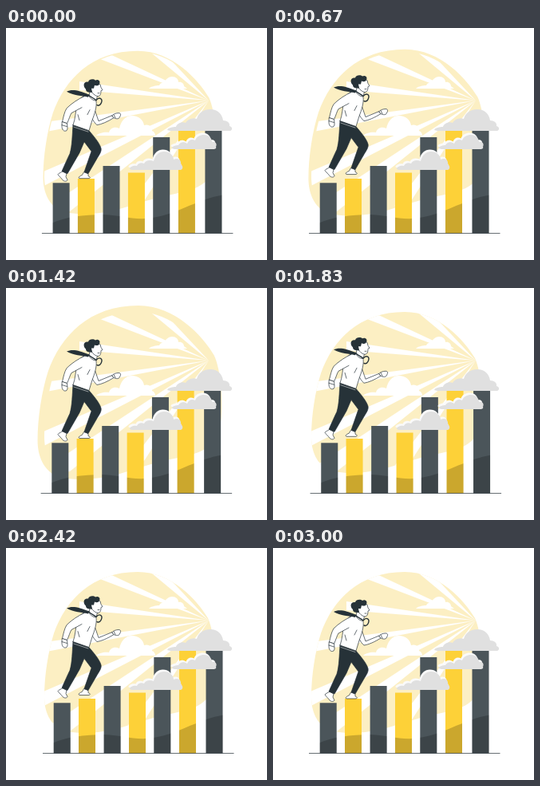
Recreate the animation shown at these times as an HTML page with a canvas. Size 327x291 px, loop 3.04 s.

```html
<!DOCTYPE html>
<html lang="en">
<head>
<meta charset="utf-8">
<title>Climbing the chart</title>
<style>
html, body { margin: 0; width: 100%; height: 100%; overflow: hidden; background: #fff; }
canvas { display: block; width: 327px; height: 291px; }
</style>
</head>
<body>
<canvas id="stage"></canvas>
<script>
const W = 327, H = 291, FRAMES = 73, LOOP = 3040, STEP = 1000 / 24;
const UNIT = 0.582; // drawing units to pixels
const INK = '#263238', DARK = '#4b555a', GOLD = '#fdd138', PALE = '#fcefc3', CLOUD = '#e0e0e0';
const canvas = document.getElementById('stage');
const ctx = canvas.getContext('2d');
const ratio = window.devicePixelRatio || 1;
canvas.width = W * ratio;
canvas.height = H * ratio;

const path = d => new Path2D(d);

const blob = path('M165 30C208 30 240 66 253 88C261 105 264 145 260 170C255 194 240 201 211 207C185 212 165 219 145 225C120 232 90 235 70 228C54 221 48 203 48 187C48 160 53 129 60 107C75 65 108 30 165 30Z');

const SUN = [254, 91];
const rays = [
  [177, 27, 197, 30], [118, 39, 126, 31], [92, 67, 92, 78], [40, 119, 40, 132],
  [40, 183, 40, 202], [40, 232, 60, 246], [147, 230, 162, 234]
];

const backClouds = [
  path('M113 135C116 132 123 130 129 131C130 126 136 123 142 126C144 117 149 110 158 110C166 110 172 115 173 122C179 120 183 124 183 129C186 130 187 133 187 135Z'),
  path('M179 76C182 73 188 72 192 72C193 69 196 68 198 69C200 64 204 61 208 61C213 61 216 64 216 68C220 67 223 70 223 73L227 76Z')
];

const bigCloud = path('M202 128C203 125 209 124 213 124C214 120 220 117 225 119C228 114 234 112 239 114C241 106 248 102 256 102C265 102 271 108 272 116C277 116 281 119 280 123C284 124 284 128 281 129L206 129Z');
const smallClouds = [
  path('M208 151C208 148 213 147 216 147C218 143 223 142 227 145C229 140 233 139 237 141C239 136 243 134 248 134C254 134 258 138 258 143C262 142 265 145 263 149C264 151 262 152 260 152L211 152Z'),
  path('M155 177C155 174 160 172 164 173C165 170 169 168 173 170C175 166 180 165 185 167C187 159 192 155 198 155C205 155 210 160 210 165C216 162 220 166 219 171C222 173 222 177 219 178L158 178Z')
];

const bars = [[58.7, 194.3], [90, 189], [121.6, 173], [153, 181.5], [184.3, 137], [216, 128], [249.5, 127]];
const shade = path('M55 246C70 238 95 234 122 234C145 235 155 240 176 239C205 236 222 225 240 219C254 213 264 211 274 209V258H55Z');

const man = {
  farArm: path('M109 96C111 103 114 111 116 117L133 110L135 113C127 118 120 121 114 122C109 118 105 109 104 101Z'),
  farHand: path('M133 110C135 108 138 107 141 107C144 107 144 109 143 111L142 113C140 115 137 114 135 113Z'),
  shirt: path('M97 86C102 83 109 87 113 92C114 99 111 108 108 116L104 129L84 122C87 114 87 105 89 97C91 91 93 88 97 86Z'),
  nearArm: path('M98 86C91 89 82 95 76 101C73 106 72 112 70.5 118L76.5 120C79 115 80 110 82 107L95 100'),
  nearHand: path('M70.5 118L76.5 120C76.5 123 78 127 76 129C72 131 70 127 70 124Z'),
  pants: path('M84 122L104 129C109 135 117 144 119 151C120 155 117 159 114 164L103 183L98 181L107 155L98 143L92 157L77 183L70 180C74 171 77 164 80 158C83 148 83 135 84 122Z'),
  backShoe: path('M71 180L76 183L75 187L77 191C76 193 73 193 71 191C69 188 67 187 65 184C66 182 69 182 71 180Z'),
  frontShoe: path('M98 181L103 183L103 186C106 187 106 189 103 189L92 189C90 188 92 186 95 185Z'),
  neck: path('M105 80L104 86C107 90 111 92 113 91L115 84Z'),
  face: path('M106 72C109 69 116 69 118 71L119 75L121 78L119 79C119 83 118 86 115 86C110 85 106 80 106 76Z'),
  hair: path('M100 77C96 73 97 67 103 68C104 64 110 64 112 66C115 64 119 67 117 70C117 73 113 73 111 72L110 76L107 76L108 81C104 81 100 81 100 77Z'),
  tie: path('M76 80C82 77 91 78 104 84L103 87C95 85 85 85 76 80Z'),
  collar: path('M103 84C107 88 110 88 113 91C117 86 122 89 119 95C118 97 116 98 114 97'),
  creases: path('M90 109L92 116M105 103L102 109M70 122L76.5 124M135 109L137 113M117 82L115 82'),
  belt: path('M85 124.5L103 130.5')
};

function fill(shape, color) {
  ctx.fillStyle = color;
  ctx.fill(shape);
}

function outline(shape, color = '#fff') {
  fill(shape, color);
  ctx.stroke(shape);
}

// Linear interpolation through evenly spaced values
function through(values, p) {
  const x = p * (values.length - 1);
  const i = Math.min(Math.floor(x), values.length - 2);
  return values[i] + (values[i + 1] - values[i]) * (x - i);
}

const shake = p => UNIT * through([0, -1, 2, -4, 4, -4, 4, -4, 2, -1, 0], p);
const beat = p => 1 + 0.1 * through([0, 1, 0.5, 0, 0, 1, 0, 0, 0, 0, 0], p);
const hover = p => -10 * UNIT * through([0, 1, 0, 1, 0], p);

function moved(x, y, draw) {
  ctx.save();
  ctx.translate(x, y);
  draw();
  ctx.restore();
}

function drawSky(scale) {
  ctx.save();
  ctx.translate(154, 130);
  ctx.scale(scale, scale);
  ctx.translate(-154, -130);
  fill(blob, PALE);
  ctx.restore();

  ctx.save();
  ctx.clip(blob);
  for (const [ax, ay, bx, by] of rays) {
    fill(path(`M${SUN}L${ax} ${ay}L${bx} ${by}Z`), '#fff');
  }
  ctx.restore();
  backClouds.forEach(c => fill(c, '#fff'));
}

function drawChart() {
  const all = new Path2D();
  bars.forEach(([x, y], i) => {
    ctx.fillStyle = i % 2 ? GOLD : DARK;
    ctx.fillRect(x, y, 21, 257.5 - y);
    all.rect(x, y, 21, 257.5 - y);
  });
  ctx.save();
  ctx.clip(all);
  fill(shade, 'rgba(0,0,0,0.2)');
  ctx.restore();
  ctx.fillStyle = INK;
  ctx.fillRect(45, 257.1, 239.5, 0.7);
}

function drawFrontClouds() {
  fill(bigCloud, CLOUD);
  for (const c of smallClouds) {
    moved(-1.5, -2.5, () => fill(c, '#fafafa'));
    fill(c, CLOUD);
  }
}

function drawMan() {
  ctx.strokeStyle = INK;
  ctx.lineWidth = 0.7;
  ctx.lineJoin = ctx.lineCap = 'round';
  outline(man.farArm);
  outline(man.farHand);
  outline(man.backShoe);
  outline(man.frontShoe);
  outline(man.pants, INK);
  outline(man.shirt);
  outline(man.neck);
  outline(man.face);
  fill(man.hair, INK);
  outline(man.nearArm);
  outline(man.nearHand);
  fill(man.tie, INK);
  ctx.stroke(man.creases);
  ctx.lineWidth = 1.4;
  ctx.stroke(man.collar);
  ctx.strokeStyle = '#fff';
  ctx.lineWidth = 0.5;
  ctx.stroke(man.belt);
}

function render(ms) {
  const frame = Math.min(Math.floor((ms % LOOP + 5) / STEP), FRAMES - 1);
  const p = (frame + 1) % FRAMES / FRAMES;
  ctx.setTransform(ratio, 0, 0, ratio, 0, 0);
  ctx.fillStyle = '#fff';
  ctx.fillRect(0, 0, W, H);
  drawSky(beat(p));
  moved(shake(p), 0, drawChart);
  drawFrontClouds();
  moved(0, hover(p), drawMan);
}

const start = performance.now();
function tick() {
  render(performance.now() - start);
  requestAnimationFrame(tick);
}
tick();
</script>
</body>
</html>
```
